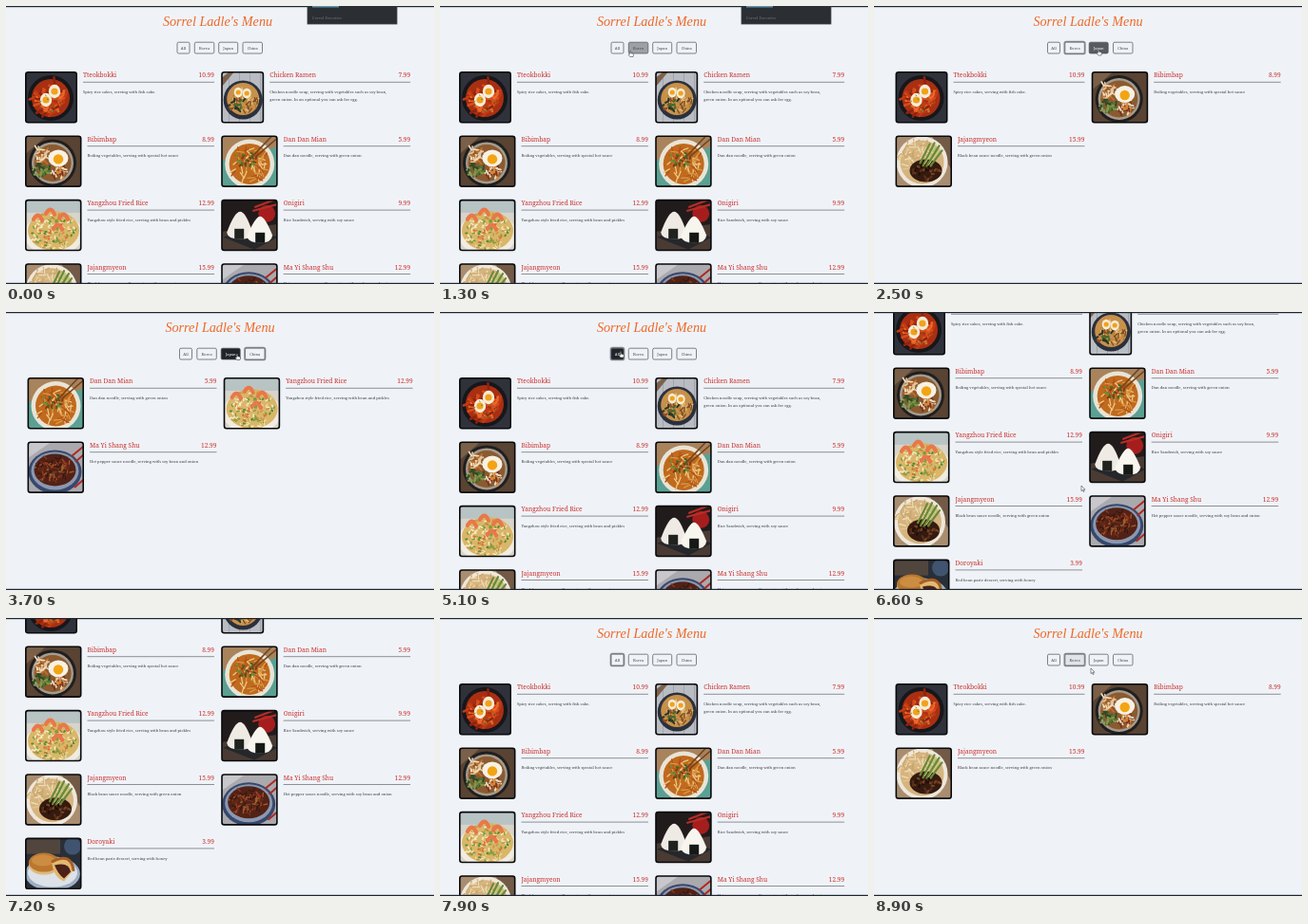
These frames come from a looping animation (450x293 px, 9000 ms). An HTML page:

```html
<!DOCTYPE html>
<html lang="en">
<head>
<meta charset="utf-8">
<title>Menu</title>
<style>
html, body { margin: 0; width: 100%; height: 100%; overflow: hidden; background: #eff3f8; }
svg { display: block; width: 100vw; height: 100vh; }
text { font-family: "Noto Serif", serif; }
.heading { font: italic 14.2px "Liberation Serif", serif; fill: #ef6828; text-anchor: middle; }
.name, .price { font-size: 6.6px; fill: #cb2f2b; }
.price { text-anchor: end; }
.desc { font-size: 4.1px; fill: #3c4045; }
.label { font-size: 4px; text-anchor: middle; }
</style>
</head>
<body>
<svg id="stage" viewBox="0 0 450 293" preserveAspectRatio="none">
  <rect width="450" height="293" fill="#eff3f8"/>
  <g id="page">
    <text id="heading" class="heading" y="20.5">Sorrel Ladle's Menu</text>
    <g id="buttons"></g>
    <g id="items"></g>
  </g>
  <rect width="450" height="1.2" fill="#1b2430"/>
  <rect y="291.8" width="450" height="1.2" fill="#1b2430"/>
  <g id="tooltip">
    <rect x="317" y="-2" width="94" height="21" fill="#2b2e32" stroke="#3d4146" stroke-width=".8"/>
    <rect x="322" y="0" width="28" height="1.5" fill="#5f93a8"/>
    <text x="322" y="13.6" font-size="4" fill="#73777b">Corvel Favorites</text>
  </g>
  <g id="cursor" stroke="#222" stroke-width=".5" stroke-linejoin="round" fill="#fff">
    <path id="arrow" d="M0 0V5.6L1.3 4.5 2.3 6.6 3.1 6.2 2.2 4.2H4Z"/>
    <path id="hand" d="M-.6 0Q0-.8 .6 0V2.2L3 2.8Q3.6 3 3.5 4L3 6H-.2L-2 3.7Q-1.6 2.9-.6 3.6Z"/>
  </g>
</svg>
<script>
const LOOP = 9000, STEP = 100, FADE = 150;
const ROW_TOP = 69, ROW_PITCH = 67.4, PHOTO_H = 54.5, COL_W = 199;
const $ = id => document.getElementById(id);

function seeded(seed) {
  return () => (seed = (seed * 16807) % 2147483647) / 2147483647;
}

const rect = (x, y, w, h, fill) => `<rect x="${x}" y="${y}" width="${w}" height="${h}" fill="${fill}"/>`;
const oval = (x, y, rx, ry, fill) => `<ellipse cx="${x}" cy="${y}" rx="${rx}" ry="${ry}" fill="${fill}"/>`;
const disc = (x, y, r, fill) => oval(x, y, r, r, fill);
const shape = (d, fill) => `<path d="${d}" fill="${fill}"/>`;
const stroke = (d, color, width) =>
  `<path d="${d}" fill="none" stroke="${color}" stroke-width="${width}" stroke-linecap="round"/>`;
const egg = (x, y, r) => oval(x, y, r, r * 1.15, "#f6ecd8") + disc(x, y, r * .58, "#f0a21c");

// Short pieces spread over an ellipse
function bits(seed, count, x, y, rx, ry, length, width, colors) {
  const rnd = seeded(seed);
  let out = "";
  for (let i = 0; i < count; i++) {
    const a = rnd() * 6.283, r = Math.sqrt(rnd()), turn = rnd() * 6.283;
    const px = x + rx * r * Math.cos(a), py = y + ry * r * Math.sin(a);
    const dx = length * Math.cos(turn), dy = length * Math.sin(turn);
    out += stroke(`M${px.toFixed(1)} ${py.toFixed(1)}l${dx.toFixed(1)} ${dy.toFixed(1)}`,
      colors[i % colors.length], width);
  }
  return out;
}

const photos = {
  tteokbokki: () => rect(0, 0, 60, 55, "#30323b") + disc(27, 28, 24, "#17171b") +
    disc(27, 28, 20, "#a92f12") +
    bits(11, 60, 26, 28, 17, 17, 6, 2.6, ["#d94b1a", "#c13a14", "#e8692a", "#8f230d"]) +
    egg(31, 21, 6.2) + egg(22, 30, 6.2) + bits(5, 14, 28, 34, 13, 10, 1, 1, ["#6d8a3a"]),
  ramen: () => rect(0, 0, 60, 55, "#b9bdc3") +
    [8, 19, 30, 41].map(x => rect(x, 0, .8, 55, "#9a9fa7")).join("") +
    shape("M0 7L9 0H14L0 17Z", "#7c624c") + disc(23, 30, 20.5, "#2b303d") +
    disc(23, 29, 17, "#c7914a") +
    bits(21, 40, 24, 32, 14, 12, 5, 1.2, ["#e5c37e", "#b77933", "#7c4b22"]) +
    bits(8, 20, 16, 35, 8, 8, 3, 2, ["#496a2c", "#29362a", "#8d4b26"]) +
    egg(18, 22, 4.5) + egg(27, 23, 4.5),
  bibimbap: () => rect(0, 0, 60, 55, "#594333") + shape("M0 0H23L0 20Z", "#7a6048") +
    disc(29, 29, 25, "#201f20") + disc(29, 29, 22, "#a49b8d") + disc(29, 29, 19.5, "#8b5a30") +
    bits(31, 28, 19, 20, 8, 8, 5, 1.7, ["#dfc4a0", "#c06e2b", "#f0ddba"]) +
    bits(32, 28, 18, 37, 8, 7, 4, 2, ["#557334", "#2f4b25", "#86974a"]) +
    bits(33, 28, 36, 39, 8, 6, 4, 2, ["#7b3520", "#d98637", "#e8d9b8"]) +
    oval(35, 24, 10.5, 9, "#f7f1e4") + disc(35, 25, 5.2, "#f3a412"),
  dandan: () => rect(0, 0, 60, 55, "#5ba093") + shape("M0 0H60V12L0 26Z", "#a8835c") +
    disc(30, 30, 26, "#e9e4d6") + disc(30, 30, 21.5, "#c06a1e") +
    bits(41, 60, 30, 31, 17, 17, 7, 1.3, ["#ebc883", "#d99b45", "#b35118"]) +
    bits(42, 24, 26, 25, 11, 9, 2, 2, ["#6e8c35", "#3f6727", "#803a1c"]) +
    stroke("M33 22L54 0M37 22L60 2", "#73451f", 1.6),
  yangzhou: () => rect(0, 0, 60, 55, "#d8d4ca") + rect(0, 0, 60, 14, "#b8c3c4") +
    oval(30, 37, 31, 22, "#f0ece2") + oval(30, 33, 27, 21, "#d9b668") +
    bits(51, 130, 29, 34, 25, 19, 2.4, 1.4, ["#efdda9", "#c69545", "#f7edcd", "#789b3c"]) +
    [[14, 18], [27, 12], [41, 17], [35, 28]].map(([x, y]) =>
      stroke(`M${x - 5} ${y + 3}q5 -9 9 1`, "#e8784a", 4.2)).join("") +
    bits(53, 18, 29, 35, 22, 15, 1.2, 2, ["#588b35", "#df7138"]),
  onigiri: () => rect(0, 0, 60, 55, "#211b1c") + shape("M0 34L60 26V55H0Z", "#493b33") +
    shape("M2 40L30 29 59 40 35 53Z", "#25272b") + disc(48, 15, 9, "#a51e1d") +
    stroke("M34 12L60 5M36 8L57 0", "#b92d26", 2.2) +
    shape("M6 35Q14 13 20 13T33 35Q33 42 20 42T6 35Z", "#efebe4") +
    shape("M27 39Q36 18 41 18T54 38Q53 46 41 46T27 39Z", "#f8f5ef") +
    rect(14, 31, 10, 11, "#20221f") + rect(36, 35, 10, 11, "#171916"),
  jajang: () => rect(0, 0, 60, 55, "#a98d70") + shape("M38 0H60V38Z", "#725a47") +
    disc(28, 28, 27, "#eee7da") + disc(28, 28, 23, "#d5b47f") +
    bits(61, 55, 21, 21, 16, 15, 7, 1.3, ["#eedbb4", "#c9a66d", "#e3c58f"]) +
    oval(32, 37, 17, 12, "#351a10") +
    bits(62, 32, 32, 38, 14, 9, 2, 2.2, ["#593018", "#210f0b", "#764223"]) +
    bits(63, 9, 38, 18, 6, 6, 2, 1.5, ["#a9bc6d"]) +
    stroke("M29 32L41 8M33 32L46 11M37 32L49 16M26 29L36 9", "#688a38", 2.2) +
    stroke("M31 30L43 10M35 31L47 14", "#bfd087", 1),
  mayi: () => rect(0, 0, 60, 55, "#aaa9ae") + shape("M0 0H26L0 18Z", "#c8c7cb") +
    oval(29, 32, 28, 23, "#37486c") + oval(29, 31, 25, 20, "#8b98b1") +
    oval(29, 30, 22, 17, "#522216") +
    bits(71, 85, 28, 29, 18, 13, 4, 1.3, ["#873b20", "#6a2917", "#a9582c", "#361810"]) +
    bits(72, 9, 29, 28, 14, 9, 1, 1.3, ["#b22f1f", "#71833c"]) +
    stroke("M47 15L58 6M51 21L59 14M50 48L58 41", "#ad2923", 2),
  doroyaki: () => rect(0, 0, 60, 55, "#292f38") + rect(0, 0, 37, 17, "#51463e") +
    disc(50, 9, 9, "#41546f") + oval(29, 38, 29, 18, "#9eafc4") +
    oval(29, 37, 26, 15, "#dce2e8") + oval(20, 29, 16, 10, "#e0b878") +
    oval(20, 26, 16, 10, "#b9772f") + oval(19, 24, 12, 6, "#cc8c41") +
    shape("M28 26Q49 15 51 34L41 46Q30 42 28 26Z", "#e2b873") +
    shape("M31 29Q46 25 48 36L41 43Q35 39 31 29Z", "#4b2118") +
    stroke("M29 25Q48 15 51 34", "#a75f24", 3)
};

const dishes = [
  ["tteokbokki", "Korea", 55, "Tteokbokki", "10.99", "Spicy rice cakes, serving with fish cake."],
  ["ramen", "Japan", 45, "Chicken Ramen", "7.99",
    "Chicken noodle soup, serving with vegetables such as soy bean,",
    "green onion. In an optional you can ask for egg."],
  ["bibimbap", "Korea", 59.5, "Bibimbap", "8.99", "Boiling vegetables, serving with special hot sauce"],
  ["dandan", "China", 59.5, "Dan Dan Mian", "5.99", "Dan dan noodle, serving with green onion"],
  ["yangzhou", "China", 59.5, "Yangzhou Fried Rice", "12.99",
    "Yangzhou style fried rice, serving with bean and pickles"],
  ["onigiri", "Japan", 59.5, "Onigiri", "9.99", "Rice Sandwich, serving with soy sauce"],
  ["jajang", "Korea", 59.5, "Jajangmyeon", "15.99", "Black bean sauce noodle, serving with green onion"],
  ["mayi", "China", 59.5, "Ma Yi Shang Shu", "12.99",
    "Hot pepper sauce noodle, serving with soy bean and onion"],
  ["doroyaki", "Japan", 59.5, "Doroyaki", "3.99", "Red bean paste dessert, serving with honey"]
];

$("items").innerHTML = dishes.map(([photo, , w, name, price, ...lines]) => {
  const x = w + 6;
  const frame = `x=".8" y=".8" width="${w - 1.6}" height="${PHOTO_H - 1.6}" rx="2.4"`;
  return `<g><clipPath id="clip-${photo}"><rect ${frame}/></clipPath>
    <g clip-path="url(#clip-${photo})">${photos[photo]()}</g>
    <rect ${frame} fill="none" stroke="#08090b" stroke-width="1.6"/>
    <text class="name" x="${x}" y="6.4">${name}</text>
    <text class="price" x="${COL_W}" y="6.4">${price}</text>
    <path d="M${x} 11.3H${COL_W}" stroke="#74777b" stroke-width=".8"/>
    ${lines.map((line, i) => `<text class="desc" x="${x}" y="${23 + i * 7.6}">${line}</text>`).join("")}</g>`;
}).join("");
const itemNodes = [...$("items").children];

const buttons = [["All", 180, 13], ["Korea", 198.3, 20.5], ["Japan", 223.7, 20], ["China", 249, 20.5]]
  .map(([label, x, w]) => ({ label, x, w }));
$("buttons").innerHTML = buttons.map(({ label, x, w }) =>
  `<g><rect x="${x - .7}" y="37.5" width="${w + 1.4}" height="13.2" rx="2" fill="none"
      stroke="#8b9096" stroke-width="1.3"/>
    <rect x="${x}" y="38.2" width="${w}" height="11.8" rx="1.5" stroke="#4b4f54" stroke-width=".7"/>
    <text class="label" x="${x + w / 2}" y="45.5">${label}</text></g>`).join("");
const buttonNodes = [...$("buttons").children];

const clicks = [[0, "All"], [2100, "Korea"], [2700, "Japan"], [3300, "China"], [4700, "All"], [8450, "Korea"]];
const scrollKeys = [[6050, 0], [6600, 78], [7000, 107], [7450, 107], [7900, 0]];
const cursorKeys = [
  [1000, 183, 60], [1100, 186, 54], [1250, 199, 48.5], [1300, 200, 47.5], [1500, 208, 46],
  [2200, 209, 46], [2500, 236, 46], [2850, 237, 46], [3100, 262, 46], [3350, 262, 46],
  [3550, 244, 45], [3700, 243, 44.5], [3900, 236, 46], [4300, 212, 46], [4600, 191, 43],
  [5100, 190, 42], [5600, 190, 43], [6000, 218, 183], [7000, 218, 183],
  [8050, 218, 170], [8350, 212, 46], [8650, 212, 46], [8850, 228, 53], [9000, 228, 53]
];

function at(keys, t) {
  const next = keys.findIndex(key => key[0] > t);
  if (next === 0) return keys[0].slice(1);
  if (next < 0) return keys[keys.length - 1].slice(1);
  const a = keys[next - 1], b = keys[next], k = (t - a[0]) / (b[0] - a[0]);
  return a.slice(1).map((v, i) => v + (b[i + 1] - v) * k);
}

const filterAt = t => clicks.filter(([time]) => time <= t).pop()[1];
const shiftAt = t => filterAt(t) === "All" ? 0 : 2.5;
const cursorShown = t => t >= 1000 && t < 7000 || t >= 8050;

function hovers(button, t) {
  if (t < 0 || !cursorShown(t)) return false;
  const [x, y] = at(cursorKeys, t), left = button.x + shiftAt(t);
  return x >= left && x <= left + button.w && y >= 38 && y <= 50;
}

// Share of the fade window spent hovering gives a linear colour transition
function hoverLevel(button, t) {
  let hits = 0;
  for (let i = 0; i < 15; i++) hits += hovers(button, t - i * FADE / 15);
  return hits / 15;
}

const blend = (a, b, k) => `rgb(${a.map((v, i) => Math.round(v + (b[i] - v) * k))})`;
const show = (node, on) => node.setAttribute("display", on ? "inline" : "none");

function render(t) {
  const filter = filterAt(t), shift = shiftAt(t);
  $("page").setAttribute("transform", `translate(${shift} ${-at(scrollKeys, t)[0]})`);
  $("heading").setAttribute("x", 222.5);

  let slot = 0;
  dishes.forEach((dish, i) => {
    const visible = filter === "All" || dish[1] === filter;
    show(itemNodes[i], visible);
    if (!visible) return;
    const x = 20 + (slot % 2) * 206.2, y = ROW_TOP + Math.floor(slot / 2) * ROW_PITCH;
    itemNodes[i].setAttribute("transform", `translate(${x} ${y})`);
    slot++;
  });

  buttons.forEach((button, i) => {
    const [ring, box, label] = buttonNodes[i].children, level = hoverLevel(button, t);
    show(ring, t >= clicks[1][0] && button.label === filter);
    box.setAttribute("fill", blend([239, 243, 248], [33, 37, 41], level));
    label.setAttribute("fill", level > .5 ? "#fff" : "#45494e");
  });

  show($("tooltip"), t < 1700);
  show($("cursor"), cursorShown(t));
  const [x, y] = at(cursorKeys, t), pointing = buttons.some(button => hovers(button, t));
  $("cursor").setAttribute("transform", `translate(${x} ${y})`);
  show($("hand"), pointing);
  show($("arrow"), !pointing);
}

const start = performance.now();
function tick() {
  const t = (performance.now() - start) % LOOP;
  render(Math.floor(t / STEP) * STEP);
  requestAnimationFrame(tick);
}
tick();
</script>
</body>
</html>
```
